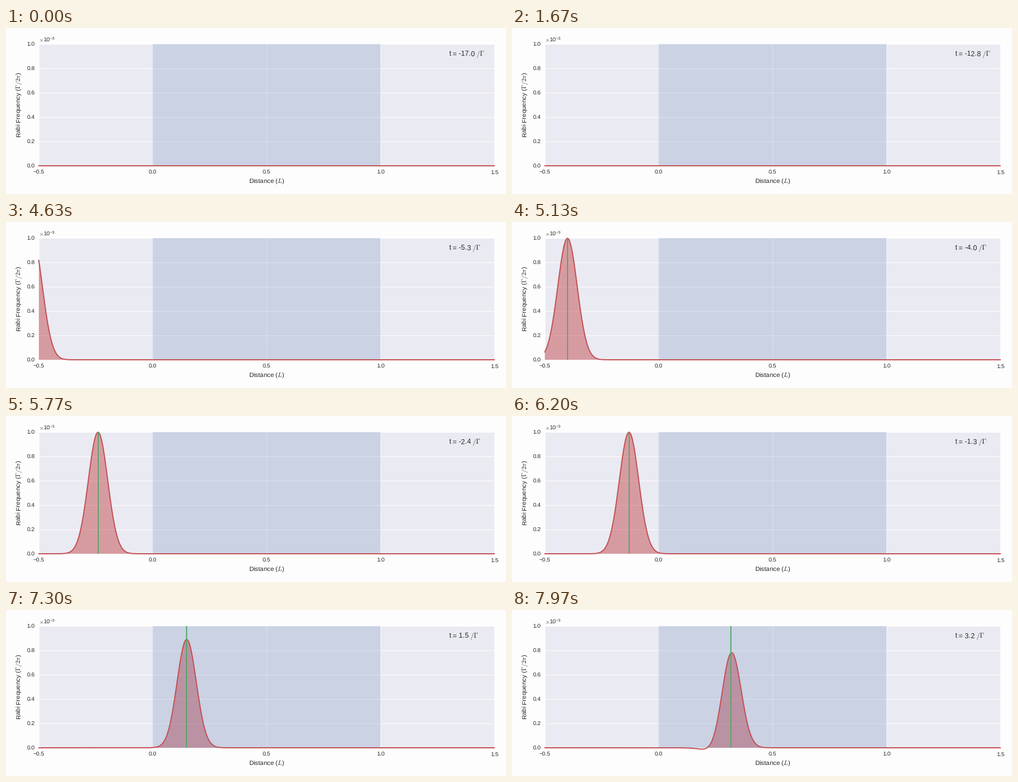
A matplotlib script for the animation above (8 s loop, 900x300 px).

```python
import math

import matplotlib.pyplot as plt
import numpy as np
from matplotlib.animation import FuncAnimation
from matplotlib.patches import Polygon

W, H, DPI = 900, 300, 75
TICK, LOOP = 20, 8000        # ms
STEPS = 240                  # simulation steps in one loop
T0, DT = -17.0, 0.0844       # start time and step, in 1/Gamma
SPEED = 0.1                  # lengths per unit time
DECAY, COUPLING = math.pi, 3.25
RED, GREEN, BLUE, INK = "#C44E52", "#55A868", "#4C72B0", "0.15"

plt.rcParams.update({
    "font.family": "Liberation Sans",
    "font.size": 12,
    "mathtext.fontset": "cm",
    "text.hinting": "none",
    "text.color": INK,
    "axes.labelcolor": INK,
    "xtick.color": INK,
    "ytick.color": INK,
    "lines.linewidth": 1.9,
    "lines.solid_capstyle": "round",
})

z = np.linspace(-0.5, 1.5, 401)
lag = np.linspace(0, 3, 121)


def pulse(tau):
    """Gaussian of unit height and unit full width at half maximum."""
    return np.exp(-4 * math.log(2) * tau**2)


def response_kernel():
    """Linear response of the absorbing medium at each depth and lag."""
    depth = COUPLING * np.clip(z, 0, 1)[:, None]
    total = np.zeros((z.size, lag.size))
    for k in range(1, 12):
        scale = (-1) ** k / (math.factorial(k) * math.factorial(k - 1))
        total += scale * depth**k * lag ** (k - 1)
    weights = np.full(lag.size, lag[1])
    weights[[0, -1]] /= 2
    return total * np.exp(-DECAY * lag) * weights


kernel = response_kernel()
inside = z > 0


def field(t):
    tau = t - z / SPEED
    y = pulse(tau)
    y[inside] += (kernel[inside] * pulse(tau[inside, None] - lag)).sum(axis=1)
    return y


fig = plt.figure(figsize=(W / DPI, H / DPI), dpi=DPI, facecolor="#fefdfe")
left, right, top, bottom = 59.0, 879.1, 29.2, 249.0
ax = fig.add_axes([left / W, 1 - bottom / H, (right - left) / W, (bottom - top) / H],
                  facecolor="#EAEAF2")
ax.set(xlim=(-0.5, 1.5), ylim=(0, 1), xticks=np.arange(-0.5, 1.6, 0.5))
ax.set_axisbelow(True)
ax.grid(color="white", linewidth=1)
ax.tick_params(length=0, pad=7, labelsize=10)
for spine in ax.spines.values():
    spine.set_visible(False)
ax.set_xlabel("Distance ($L$)", fontsize=11, labelpad=5)
ax.set_ylabel(r"Rabi Frequency ($\Gamma / 2\pi $)", fontsize=11, labelpad=5)
fig.text(left / W, 1 - 25 / H, r"$\times\mathregular{10^{-3}}$", fontsize=10)

fill = ax.add_patch(Polygon(np.zeros((3, 2)), facecolor=RED, alpha=0.5,
                            linewidth=0, zorder=1))
ax.axvspan(0, 1, facecolor=BLUE, edgecolor=BLUE, alpha=0.2, linewidth=0.3, zorder=1.1)
line, = ax.plot(z, 0 * z, color=RED, clip_on=False, zorder=2)
marker = ax.axvline(-1, color=GREEN, zorder=2.1)
clock = ax.text(0.9, 0.9, "", transform=ax.transAxes)


def update(i):
    step = round(i * TICK * STEPS / LOOP)
    t = T0 + step * DT
    y = field(t)
    line.set_ydata(y)
    outline = np.column_stack([z, y])
    fill.set_xy(np.vstack([[z[0], 0], outline, [z[-1], 0]]))
    marker.set_xdata([t * SPEED] * 2)
    clock.set_text(rf"t = {t:.1f} $/\Gamma$")
    return fill, line, marker, clock


anim = FuncAnimation(fig, update, frames=LOOP // TICK, interval=TICK,
                     repeat=True, repeat_delay=0)
plt.show()
```
